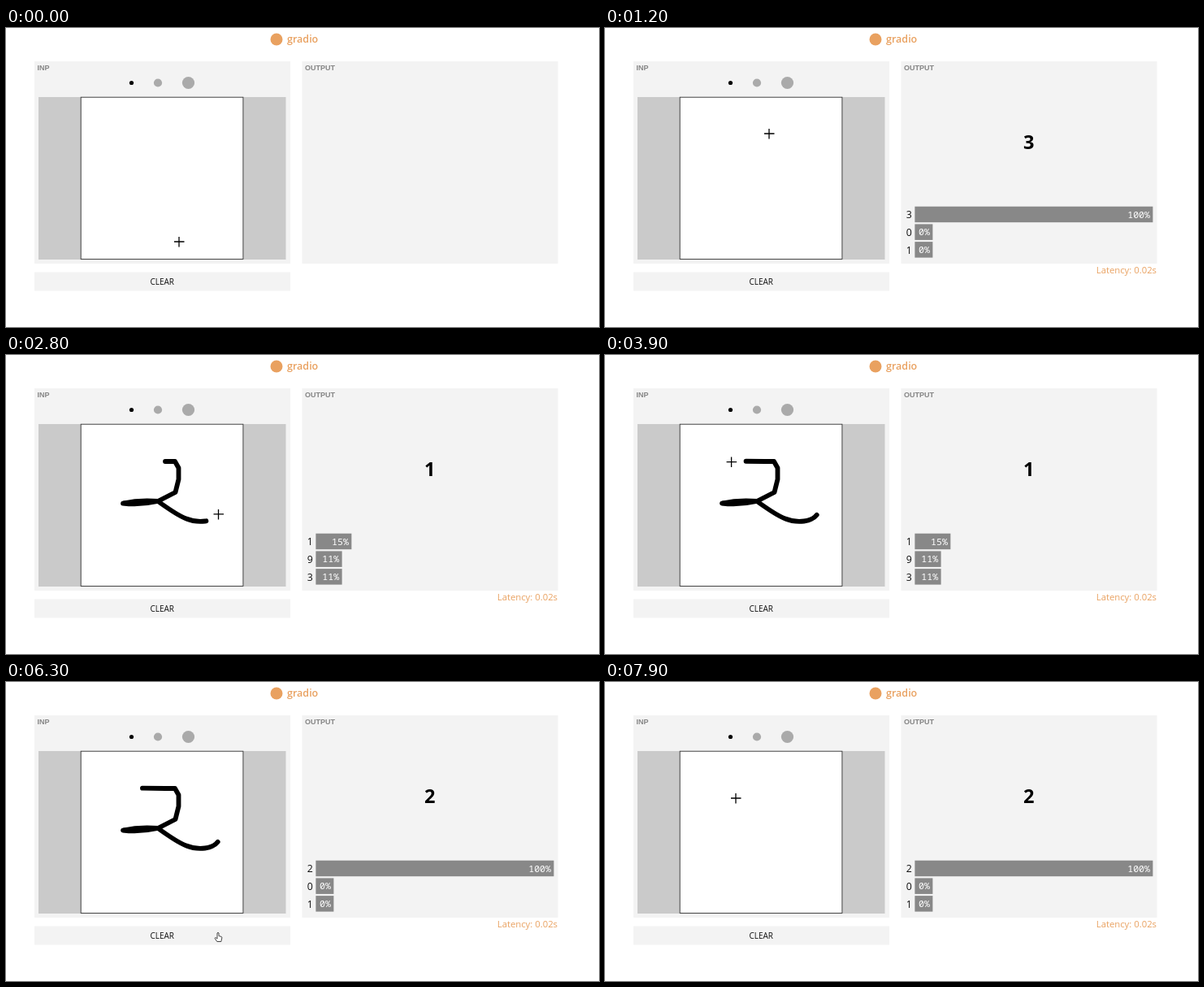
An HTML page that plays this animation: 730 px wide and 368 px high, repeating every 8000 ms.

```html
<!DOCTYPE html>
<html lang="en">
<head>
<meta charset="utf-8">
<title>Digit sketch demo</title>
<style>
  html, body { margin: 0; width: 100%; height: 100%; overflow: hidden; background: #fff; }
  svg { display: block; }
  text { font-family: "Open Sans", sans-serif; }
  .head { font: bold 9px "Liberation Sans", Arial, sans-serif; fill: #858585; }
  .pct { font: 500 11.6px "Noto Sans Mono", monospace; fill: #fff; text-anchor: end; }
  .label { font-size: 12.3px; fill: #111; }
  .accent { fill: #e9a160; }
  #trails path { fill: none; stroke-width: 5.8; stroke-linecap: round; stroke-linejoin: round; }
</style>
</head>
<body>
<svg width="730" height="368" viewBox="0 0 730 368">
  <circle class="accent" cx="333" cy="14" r="7.5"/>
  <text class="accent" x="346" y="18" font-size="12.5" font-weight="600">gradio</text>

  <g fill="#f3f3f3">
    <rect x="35" y="41" width="315" height="249"/>
    <rect x="364.5" y="41" width="315" height="249"/>
    <rect x="35" y="300.5" width="315" height="23"/>
  </g>
  <text class="head" x="38.5" y="52.3">INP</text>
  <text class="head" x="368" y="52.3">OUTPUT</text>
  <circle cx="154.5" cy="67.5" r="2.6"/>
  <circle cx="187" cy="67.5" r="5.1" fill="#aaa"/>
  <circle cx="224.5" cy="67.5" r="7.6" fill="#aaa"/>
  <rect x="40" y="85" width="304.5" height="200" fill="#cacaca"/>
  <rect x="92.2" y="85.2" width="199.7" height="199.3" fill="#fff" stroke="#333" stroke-width=".9"/>
  <text x="192.2" y="316" font-size="10" text-anchor="middle" fill="#111">CLEAR</text>

  <g id="output">
    <text id="guess" x="521.8" y="149.2" font-size="23.5" font-weight="700" text-anchor="middle"></text>
    <g id="bars"></g>
    <text class="accent" x="679" y="302" font-size="11.3" text-anchor="end">Latency: 0.02s</text>
  </g>

  <g id="trails"></g>
  <g id="cursor">
    <path id="cross" d="M-6 0H6.5M0-6V6.5" stroke="#000" stroke-width="1.3"/>
    <path id="arrow" d="M0 0V9.2L2 7.4L3.5 10.6L4.9 10L3.5 6.8H6Z" fill="#fff" stroke="#444" stroke-width=".9"/>
    <path id="hand" d="M-1 1Q0-.4 1 1V4.6L4.2 5.4Q5 5.8 4.8 7L3.8 11.5H-1.2L-3.8 7.6Q-3.8 6.2-2.4 6.8L-1 8Z" fill="#fff" stroke="#333" stroke-width=".9" stroke-linejoin="round"/>
  </g>
</svg>
<script>
const LOOP = 8000, STEP = 100, CLEARED = 6600;
const LEAD = 18; // the brush trails the pointer by this many pixels
const $ = id => document.getElementById(id);

const steady = u => u;
const speedUp = u => u * u;
const settle = u => 1 - (1 - u) ** 2.5;
const swing = u => u * u * (3 - 2 * u);

// Pointer moves; those with ink leave a line behind them.
const moves = [
  { from: 0, to: 900, ease: settle, d: "M213 263L216 222Q203 133 176 130" },
  { from: 900, to: 1200, ease: steady, d: "M176 130H202" },
  { from: 1400, to: 2850, ease: speedUp, ink: true,
    d: "M196 131H208L212.5 139V153L208.5 169L187 180Q165 185 144 182.5Q165 178 187 180" +
       "Q212 198 222 201.5Q233 206 245 204.5Q256 203 260.5 197L273 184" },
  { from: 3100, to: 3500, ease: swing, d: "M273 184Q240 140 178 131" },
  { from: 3500, to: 4000, ease: steady, ink: true, d: "M196 131L168 130.7L150 132" },
  { from: 4000, to: 4500, ease: swing, d: "M150 132Q180 200 242 287" },
  { from: 5100, to: 5600, ease: swing, d: "M242 287L228 282Q380 260 516 172" },
  { from: 5600, to: 6000, ease: swing, d: "M516 172Q400 220 278 276" },
  { from: 6000, to: 6300, ease: steady, d: "M278 276Q274 300 261 308" },
  { from: 6700, to: 7500, ease: settle, d: "M261 308Q215 222 179 143L161 143" }
];
for (const m of moves) {
  m.path = document.createElementNS("http://www.w3.org/2000/svg", "path");
  m.path.setAttribute("d", m.d);
  $("trails").append(m.path);
  m.length = m.path.getTotalLength();
}

// Rows of [digit, percent]; the first row is the guess.
const sure = digit => [[digit, 100], [0, 0], [1, 0]];
const results = [
  { from: 0 },
  { from: 500, rows: sure(3) },
  { from: 1700, rows: [[1, 15], [9, 11], [3, 11]] },
  { from: 4700, rows: sure(2) },
  { from: CLEARED },
  { from: 7400, rows: sure(2) }
];

const latest = (list, t) => list.filter(item => item.from <= t).pop();
const show = (id, on) => $(id).setAttribute("visibility", on ? "visible" : "hidden");

function drawOutput(t) {
  const { rows } = latest(results, t);
  show("output", rows);
  if (!rows) return;
  $("guess").textContent = rows[0][0];
  $("bars").innerHTML = rows.map(([digit, pct], i) => {
    const y = 219.7 + i * 21.7, w = Math.max(22, pct * 2.93);
    return `<text class="label" x="370.8" y="${y + 14.6}">${digit}</text>
      <rect x="381.4" y="${y}" width="${w}" height="19.5" fill="#888"/>
      <text class="pct" x="${378 + w}" y="${y + 14}">${pct}%</text>`;
  }).join("");
}

// Distance of the pointer along a move's path.
function travel(m, t) {
  const u = Math.min(1, Math.max(0, (t - m.from) / (m.to - m.from)));
  const lead = m.ink ? LEAD : 0;
  return lead + (m.length - lead) * m.ease(u);
}

function drawInk(t) {
  for (const m of moves.filter(m => m.ink)) {
    const visible = t >= m.from && t < CLEARED;
    m.path.setAttribute("stroke", visible ? "#000" : "none");
    m.path.setAttribute("stroke-dasharray", `${travel(m, t) - LEAD} 999`);
  }
}

function drawCursor(t) {
  const m = latest(moves, t);
  const { x, y } = m.path.getPointAtLength(travel(m, t));
  const kind = x > 92 && x < 292 && y < 285 ? "cross" : x < 350 && y > 300 ? "hand" : "arrow";
  for (const id of ["cross", "arrow", "hand"]) show(id, id === kind);
  $("cursor").setAttribute("transform", `translate(${x} ${y})`);
}

let last = -1;
const start = performance.now();
function frame() {
  const t = Math.floor((performance.now() - start) % LOOP / STEP) * STEP;
  if (t !== last) {
    drawOutput(t);
    drawInk(t);
    drawCursor(t);
    last = t;
  }
  requestAnimationFrame(frame);
}
frame();
</script>
</body>
</html>
```
